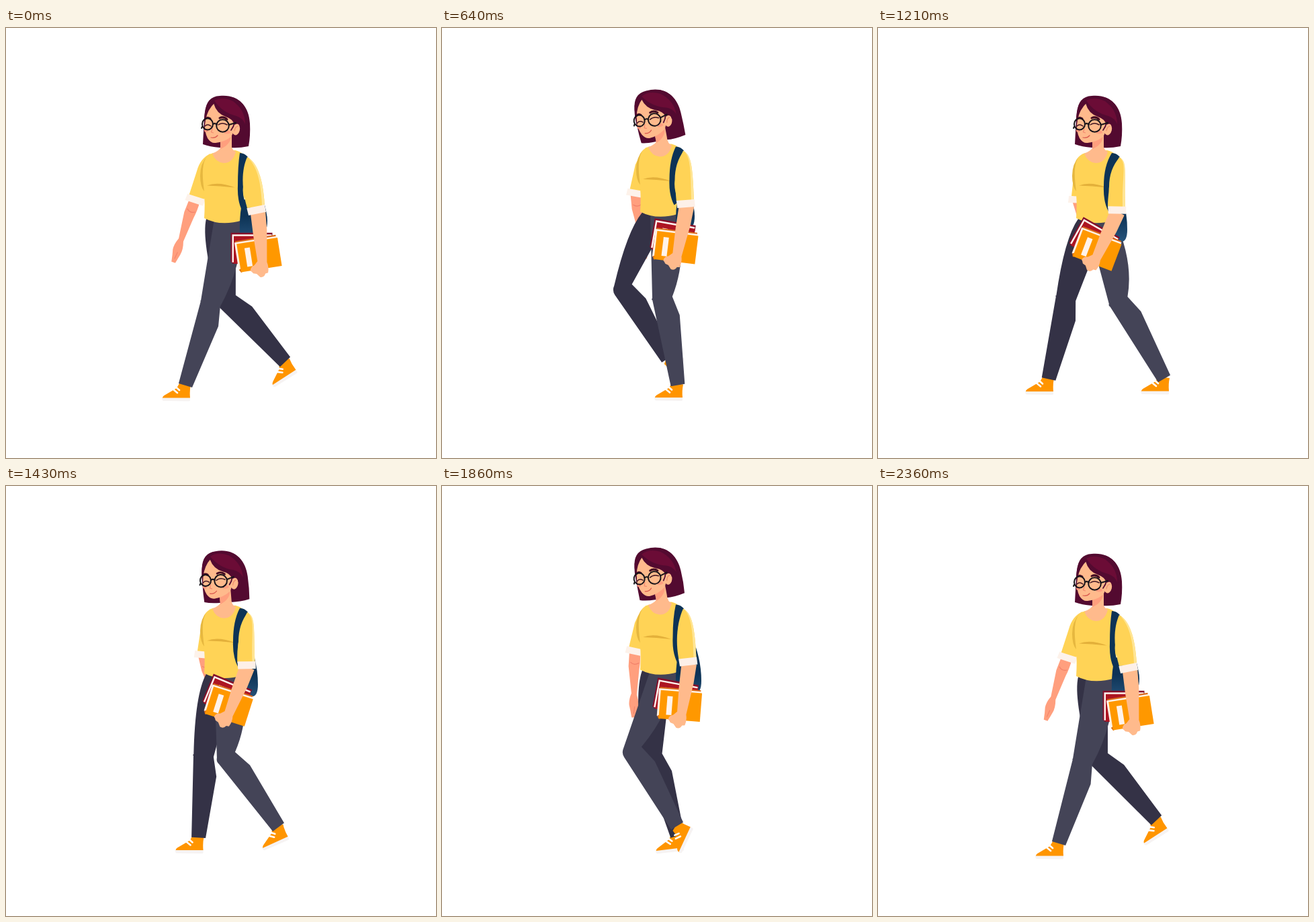
Animation of 640x640 px, one loop 2430 ms. Source, as an HTML page:

```html
<!DOCTYPE html>
<html lang="en">
<head>
<meta charset="utf-8">
<title>Student walking</title>
<style>
  html, body { margin: 0; width: 100%; height: 100%; overflow: hidden; background: #fff; }
  svg { display: block; width: 100vw; height: 100vh; }
  .line { fill: none; stroke-linecap: round; stroke-linejoin: round; }
</style>
</head>
<body>
<svg viewBox="0 0 640 640">
  <defs>
    <linearGradient id="navy" x1="0" y1="250" x2="0" y2="318" gradientUnits="userSpaceOnUse">
      <stop offset=".45" stop-color="#0d3356"/>
      <stop offset="1" stop-color="#27547c"/>
    </linearGradient>
    <g id="shoe">
      <path d="M-35 18L7 18L7 22Q7 23.5 5 23.5L-33 23Q-35 22 -35 18Z" fill="#f6f3f3"/>
      <path d="M-9 -3L8 -1Q6 8 7 18.500L-34 18.500Q-34 16 -30 14L-13 4Z" fill="#ff9500"/>
      <path class="line" d="M-18 6L-12 11M-14 2.500L-9 7" stroke="#fff" stroke-width="2.600"/>
    </g>
  </defs>

  <g id="farArm">
    <path d="M-8 0L8 0Q9 14 7 26L4 64Q8 76 6 84L3 98L-3 98L-5 88L-7 80Q-8 72 -4 62L-9 22Z" fill="#ff9f7e"/>
    <path class="line" d="M-6 16Q-1 21 6 17" stroke="#f2806a" stroke-width="1.200"/>
    <path class="line" d="M1 82L0 92" stroke="#f2806a" stroke-width="1"/>
  </g>
  <path id="farSleeve" fill="#ffd356"/>
  <path id="farCuff" d="M-13 -6L15 -5L14 5L-14 4Z" fill="#fdf2ea"/>

  <g id="farLeg"><use href="#shoe"/><path fill="#343246"/></g>
  <g id="nearLeg"><use href="#shoe"/><path fill="#444457"/></g>

  <g id="torso">
    <path d="M308 186Q299 189 295 197Q287 216 293 236Q297 252 295 283Q320 296 352 286L359 200Q356 185 341 182Z" fill="#ffd356"/>
    <path d="M300 190Q289 202 289 220Q289 236 295 243Q292 222 293 210Q294 197 300 190Z" fill="#e6b73f"/>
    <path d="M299 234.500Q316 228 341 237.500Q318 235 299 234.500Z" fill="#e3b03a"/>
    <path d="M307 187Q316 183 319 179L336 177Q337 182 342 184Q338 201 324 201Q312 200 307 187Z" fill="#ffba8c"/>
  </g>
  <path id="strap" fill="#0d3356"/>
  <path id="bag" fill="url(#navy)"/>

  <g id="foreArm">
    <g transform="translate(-33.600 47.900) rotate(-6.500)">
      <g id="red">
        <path d="M0 0H62V46H3L0 43Z" fill="#84102a"/>
        <path d="M2 2.500H61V44H2Z" fill="#fff3ee"/>
        <path d="M4.500 5H62V46H4.500Z" fill="#ad1522"/>
        <path d="M14 12H22V18H14Z" fill="#fff3ee"/>
      </g>
      <path d="M0 -3H61V40H4L0 42Z" fill="#d96a1c"/>
      <path d="M-1.500 -1H62V42H2L-1.500 40Z" fill="#fff3e6"/>
      <path d="M-1 40L3 38V44.500H1.500Z" fill="#d9701c"/>
      <path d="M1.500 1.500H63V44H1.500Z" fill="#ff9800"/>
      <path d="M12 9.500H20V37.500H12Z" fill="#fff3ea"/>
    </g>
    <path d="M-9.500 2L13 2L14 30L12 78Q15 86 13 94L9 95Q7 101 1 100L-4 95L-9 94Q-11 91 -13 90Q-13 84 -7 82L-2 76Q-7 40 -9.500 2Z" fill="#ffba8c"/>
  </g>
  <path id="sleeve" fill="#ffd356"/>
  <path id="shine" fill="#ffe594"/>
  <path id="cuff" d="M-14 -5L13 -6L13.500 5L-13 6Z" fill="#fdf0e8"/>

  <g id="head">
    <path id="hair" fill="#530a30"/>
    <path id="neck" fill="#ffba8c"/>
    <path id="neckShade" fill="#ff9f7e"/>
    <path d="M309 112Q297 122 296 140Q295 154 300 164Q305 172 312 171Q324 170 335 162L341 150L340 130Z" fill="#ffba8c"/>
    <ellipse cx="342.500" cy="151" rx="5.500" ry="8.500" fill="#ffba8c" transform="rotate(14 342 151)"/>
    <path class="line" d="M340 153Q341 147 345 146" stroke="#f08a6c" stroke-width="1.200"/>
    <ellipse cx="298" cy="152.500" rx="3" ry="2.500" fill="#ff967c"/>
    <ellipse cx="329" cy="155" rx="5" ry="2.500" fill="#ff9f80"/>
    <path d="M309 112Q313 127 327 132Q337 135 340 144L344 141Q348 142 348 149L362 142Q360 112 340 104Q320 99 309 112Z" fill="#530a30"/>
    <path d="M311 111Q300 121 297 137L295 152Q293 120 303 108Z" fill="#530a30"/>
    <path d="M310 108Q322 126 343 131Q352 134 356 143Q356 122 338 109Q322 101 310 108Z" fill="#6b0c36"/>
    <path class="line" d="M340 141Q339 147 335 152" stroke="#530a30" stroke-width="1.800"/>
    <path class="line" d="M297 135Q300 132 304 135M318 134Q324 131 329 136" stroke="#430a22" stroke-width="3"/>
    <path class="line" d="M296 146Q300 142 305 146M316 144Q322 140 329 144" stroke="#3a1220" stroke-width="1.500"/>
    <path class="line" d="M307 150L305.500 155L308.500 156" stroke="#f28a70" stroke-width="1.200"/>
    <path class="line" d="M305 163Q311 164.500 315 160" stroke="#d9584e" stroke-width="1.200"/>
    <g class="line" stroke="#17141a" stroke-width="2">
      <ellipse cx="300" cy="143" rx="8" ry="8.500"/>
      <circle cx="322.500" cy="145.500" r="9.300"/>
      <path d="M308 143Q311 141 313.500 143.500M332 144L342 141M292 147L291 149"/>
    </g>
  </g>
</svg>

<script>
const LOOP = 2430, STEPS = 34;
const $ = id => document.getElementById(id);

// step, bob, hair sway, elbow x, forearm turn, red book turn, bag x, bag y, far elbow x, far forearm turn
const BODY = [
  [0, 0, 0, 373, -2.5, 9, 389, 305, 281, 19],
  [4, -5, 4, 370, 3, 3, 385, 294, 284, 12],
  [9, -9.5, 4, 363, 13.5, 3, 376, 298, 288.5, -8],
  [17, 0, 0, 356, 27.3, 8.5, 371, 318, 297, -20],
  [22, -7.5, 4, 361, 20.5, 3, 379, 310, 291, -11],
  [26, -9.5, 2, 366.5, 11, 6, 386, 308, 287, 1],
  [29, -5, 0, 370, 3, 8.5, 390, 304, 284, 12],
  [33, 0, 0, 373, -2.5, 9, 389, 305, 281, 18.7]
];
// step, knee x, knee y, ankle x, ankle y, foot turn
const NEAR = [
  [0, 304.5, 410, 267, 532, 0],
  [4, 318, 407, 313.5, 535.5, 0],
  [9, 328, 402.5, 351, 531.5, 0],
  [16, 357, 407.5, 424, 522, 0],
  [17, 358.5, 407.5, 426, 522, 0],
  [22, 305, 402, 385, 500, -45],
  [26, 284, 396, 350, 506, -65],
  [29, 293, 401, 328, 523, -33],
  [31, 299, 407, 288, 535, -12],
  [33, 304.5, 410, 269, 532, 0]
];
const FAR = [
  [0, 331, 408, 415.5, 497, -33],
  [4, 295.6, 398.5, 371.5, 498, -50],
  [9, 270, 389.5, 336, 492, -75],
  [13, 273, 397, 289, 518, -25],
  [16, 279.5, 403, 255.5, 522.5, 0],
  [17, 279.5, 403, 254, 522.5, 0],
  [22, 305, 402, 315.5, 524, 0],
  [29, 319, 404, 375.5, 515, -16],
  [33, 331, 408, 414.5, 497.5, -33]
];

// Periodic monotone cubic through the rows of a pose table.
function track(rows) {
  const n = rows.length;
  const at = (i, c) => {
    const turn = Math.floor(i / n);
    return rows[i - turn * n][c] + (c ? 0 : turn * STEPS);
  };
  const rise = (i, c) => (at(i + 1, c) - at(i, c)) / (at(i + 1, 0) - at(i, 0));
  const slope = (i, c) => {
    const a = rise(i - 1, c), b = rise(i, c);
    return a * b > 0 ? 2 * a * b / (a + b) : 0;
  };
  return k => {
    let i = n - 1;
    while (rows[i][0] > k) i--;
    const span = at(i + 1, 0) - at(i, 0), u = (k - at(i, 0)) / span;
    const w = u * u * (3 - 2 * u);
    return rows[0].slice(1).map((_, j) => {
      const c = j + 1;
      return at(i, c) * (1 - w) + at(i + 1, c) * w
        + span * u * (1 - u) * ((1 - u) * slope(i, c) - u * slope(i + 1, c));
    });
  };
}

const bodyAt = track(BODY), nearAt = track(NEAR), farAt = track(FAR);
const draw = (id, d) => $(id).setAttribute('d', d);
const move = (el, x, y, turn = 0) =>
  el.setAttribute('transform', `translate(${x} ${y}) rotate(${turn})`);
const unit = (x, y) => { const l = Math.hypot(x, y); return [x / l, y / l]; };

function leg(id, [kx, ky, ax, ay, turn], hipL, hipR, hipY, bulgeL, bulgeR) {
  const [dx, dy] = unit(ax - kx, ay - ky);
  const [tx, ty] = unit(kx - (hipL + hipR) / 2, ky - hipY);
  // "along" runs down the shin, "back" points behind the leg
  const shin = (x, y, along, back) =>
    [x + dx * along + dy * back, y + dy * along - dx * back];
  const front = [kx - ty * 15, ky + tx * 15];
  const [cx, cy] = unit(-ty - dy, tx + dx);
  const low = shin(kx, ky, 0, -15), back = shin(kx, ky, 0, 15);
  const mix = (a, b, u) => a + (b - a) * u;
  const [shoe, cloth] = $(id).children;
  move(shoe, ax, ay, turn);
  cloth.setAttribute('d', `M${hipL} ${hipY}
    Q${mix(hipL, front[0], .25) - bulgeL} ${mix(hipY, front[1], .25)} ${front}
    Q${kx + cx * 17} ${ky + cy * 17} ${low}
    L${shin(ax, ay, 0, -10.5)} L${shin(ax, ay, 0, 10.5)}
    L${shin(kx, ky, 29, 21)} L${back}
    Q${mix(hipR, back[0], .55) + bulgeR} ${mix(hipY, back[1], .55)} ${hipR} ${hipY}Z`);
}

function pose(k) {
  const [bob, sway, ex, turn, redTurn, bx, by, fx, farTurn] = bodyAt(k);
  const Y = y => y + bob;
  const ey = Y(271), fy = Y(256);

  move($('farArm'), fx, fy, farTurn);
  move($('farCuff'), fx, fy, 16 - (fx - 281));
  draw('farSleeve', `M304 ${Y(187)} Q${fx + 8} ${Y(194)} ${(fx + 287) / 2} ${Y(213)}
    L${fx - 9} ${Y(250)} L${fx + 14} ${Y(255)} L310 ${Y(230)}Z`);

  leg('farLeg', farAt(k), 298, 342, Y(284), 12, 0);
  leg('nearLeg', nearAt(k), 310, 352, Y(284), 0, 18);

  move($('torso'), 0, bob);
  const sx = 345 - (389 - bx) / 2;
  draw('strap', `M348 ${Y(186)} Q${sx} ${Y(205)} ${sx} ${Y(235)}
    Q${sx - 1} ${Y(258)} ${sx + 7} ${Y(273)} L${sx + 14} ${Y(268)}
    Q${sx + 6} ${Y(250)} ${sx + 8} ${Y(236)} Q${sx + 8} ${Y(210)} 360 ${Y(192)}
    Q355 ${Y(186)} 348 ${Y(186)}Z`);
  draw('bag', `M352 ${Y(256)} L${bx - 8} ${Y(250)} Q${bx} ${Y(275)} ${bx} ${by - 18}
    Q${bx} ${by} ${bx - 9} ${by} L348 ${by} Q347 ${Y(280)} 352 ${Y(256)}Z`);

  move($('foreArm'), ex, ey, turn);
  $('red').setAttribute('transform', `translate(-4.5 -16.5) rotate(${redTurn})`);
  const outer = `C372 ${Y(199)} ${ex + 10} ${ey - 50} ${ex + 12} ${ey - 5}`;
  draw('sleeve', `M359 ${Y(192)} ${outer} L${ex - 14} ${ey - 3}
    C${346 + (ex - 364.5) * .53} ${Y(240)} 350 ${Y(212)} 359 ${Y(192)}Z`);
  draw('shine', `M361 ${Y(194)} ${outer} L${ex + 8} ${ey - 5}
    C${ex + 7} ${ey - 50} 370 ${Y(203)} 361 ${Y(194)}Z`);
  move($('cuff'), ex, ey, 3 - (ex - 356) * .7);

  $('head').setAttribute('transform', `translate(0 ${bob}) rotate(${bob * 1.1} 322 180)`);
  draw('hair', `M318 101 C345 98 362 116 363 142 Q364 160 ${361 + sway * .7} 176
    Q346 ${179 + sway * .2} 335 178 L318 178
    Q304 ${177 + sway * .3} ${293 + sway} ${173 + sway * .8}
    Q294 150 296 126 Q298 102 318 101Z`);
  draw('neck', 'M319 164L336 158L336 182L319 183Z');
  draw('neckShade', 'M319 168Q328 167 335 161Q334 174 319 180Z');
}

// The walk advances in even steps that fall on whole hundredths of a second.
function stepAt(t) {
  let k = Math.floor((t + 5) * STEPS / LOOP);
  if (Math.round(k * LOOP / STEPS / 10 - .01) * 10 > t) k--;
  return Math.min(Math.max(k, 0), STEPS - 1);
}

const start = performance.now();
function tick() {
  pose(stepAt((performance.now() - start) % LOOP));
  requestAnimationFrame(tick);
}
tick();
</script>
</body>
</html>
```
